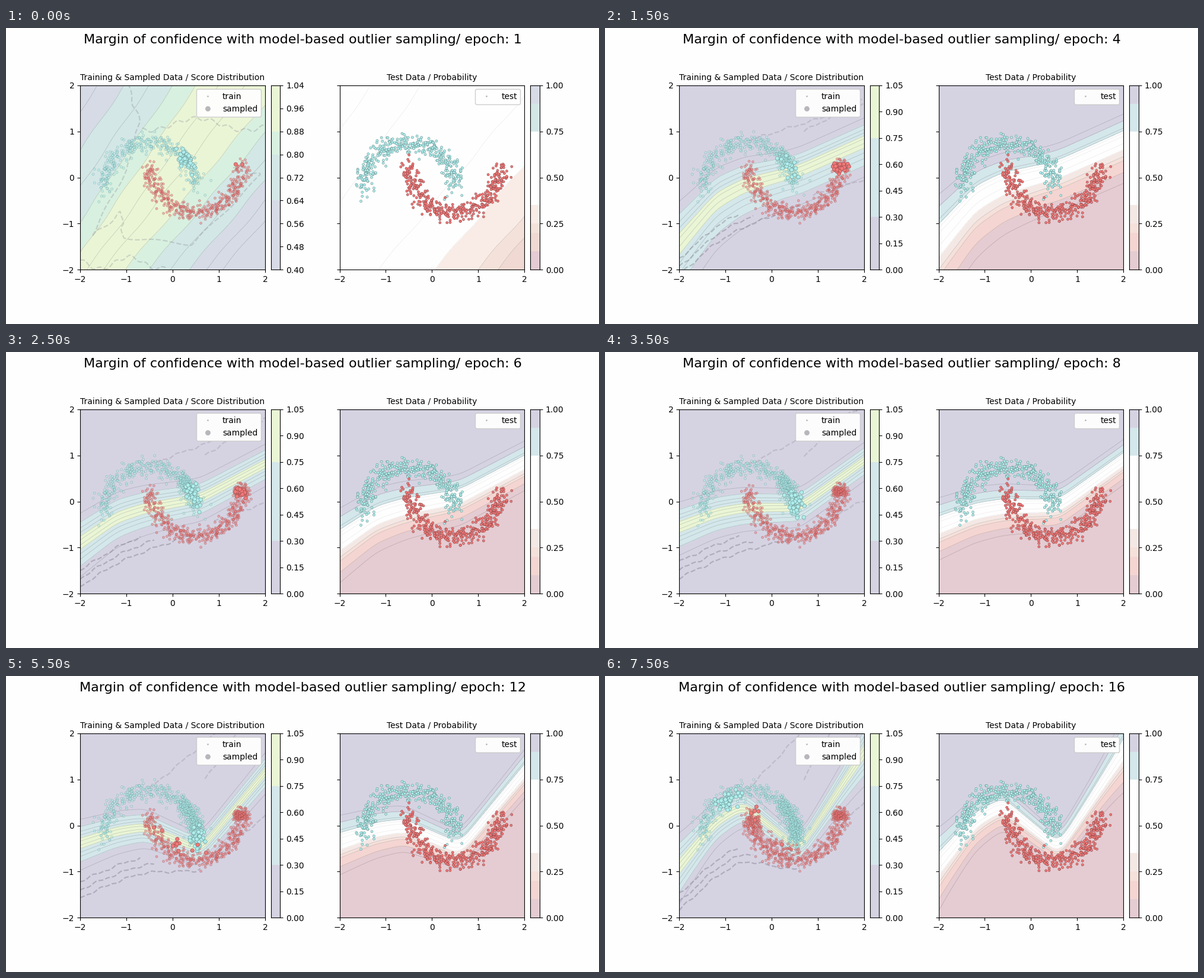
A matplotlib script that plays this animation: 1000 by 500 pixels, repeating every 8000 ms.

```python
import numpy as np
import matplotlib.pyplot as plt
from matplotlib.animation import FuncAnimation
from matplotlib.colors import to_rgb
from matplotlib.lines import Line2D

plt.rcParams["font.family"] = "DejaVu Sans"
W, H = 1000, 500
EPOCHS, BATCH = 16, 50
PAPER, TEAL, RED = "#fefefe", "#aeeeec", "#f07878"
PURPLE, BLUE, LIME = "#d5d3e2", "#d4e7ea", "#eaf5d6"
MIST, SKY, GREEN = "#d7dbe6", "#d3e7e6", "#d8f0e0"
PINKS = ["#e4ccd2"] * 2 + ["#f4d5d2", "#f6e0da", "#f4e8e5"]
PEACHES = ["#e5cbd3"] * 2 + ["#f0d9d2", "#f4e2da", "#f9ebe5"]

axis = np.linspace(-2, 2, 200)
GX, GY = np.meshgrid(axis, axis)


def bell(t, peak, width):
    return np.exp(-((t - peak) / width) ** 2)


def moon(cls, angle, radius):
    x, y = radius * np.cos(angle), radius * np.sin(angle)
    return (x - .5, y - .25) if cls == 0 else (x + .5, .25 - y)


def join(groups):
    """Merge (class, x, y) groups into coordinates and colours."""
    cols = [(TEAL, RED)[cls] for cls, x, _ in groups for _ in x]
    return (np.concatenate([g[1] for g in groups]),
            np.concatenate([g[2] for g in groups]), cols)


def make_moons(n, seed):
    rng = np.random.default_rng(seed)
    groups = []
    for cls in (0, 1):
        x, y = moon(cls, np.linspace(0, np.pi, n), 1)
        groups.append((cls, x + rng.normal(0, .1, n), y + rng.normal(0, .1, n)))
    return join(groups)


def pick(epoch):
    """A batch shared between the places where the model is unsure."""
    # class, centre and spread in degrees, radius, weight
    spots = [
        (0, 40 - 3.7 * (epoch - 1), 8, 1.03, bell(epoch, 7, 5)),
        (1, 1.2 * epoch - 3, 4, .98, 1.4 * bell(epoch, 4.3, 1.5)),
        (1, 6 * epoch + 80, 8, .9, 3 * bell(epoch, 14.5, 1.1)),
        (1, 110, 20, .79, 1.2 * bell(epoch, 14, 1.3)),
        (0, 120, 10, .9, 6 * bell(epoch, 16.5, .8))]
    total = sum(s[-1] for s in spots)
    rng = np.random.default_rng(epoch)
    groups = []
    for cls, centre, spread, radius, weight in spots:
        n = round(BATCH * weight / total)
        angle = np.radians(rng.normal(centre, spread, n))
        groups.append((cls, *moon(cls, angle, rng.normal(radius, .08, n))))
    return join(groups)


def boundary(epoch, at):
    """Smooth curve through the edges, the crest and the trough."""
    t = max(epoch - 4, 0) / 12
    lo = -.36 - .021 * (max(epoch, 4) - 11) ** 2
    crest = -.14 + .58 * t ** 4
    trough = -.2 + .38 * np.cos(np.pi * (.5 + 12 * t) / 10.5)
    hi = .8 + .8 * t ** 2
    knots = [-2, -1.2, -.6, 0, .6, 2]
    heights = [lo, lo + .74 * (crest - lo), crest, (crest + trough) / 2,
               trough, hi]
    x = np.linspace(-3, 3, 601)
    y = np.interp(x, knots, heights)
    first, last = np.diff(heights)[[0, -1]] / np.diff(knots)[[0, -1]]
    y += first * np.minimum(x + 2, 0) + last * np.maximum(x - 2, 0)
    kernel = bell(np.arange(-40, 41) / 100, 0, .18)
    return np.interp(at, x, np.convolve(y, kernel / kernel.sum(), "same"))


def untrained_logit():
    u = GY - 1.17 * GX + .03 * np.sin(5 * GY)
    upper = .225 * (u - .3 * (GX + .6))
    lower = .23 * u + .01 * u ** 3 - .06
    return lower + (upper - lower) / (1 + np.exp(-4 * u))


def trained_logit(epoch):
    e = max(epoch, 4)
    steep = np.interp(axis, [-2, .3, 2], [5 - .05 * (e - 10.5) ** 2,
                                          5.2 + .27 * (e - 4),
                                          6.5 - .055 * (e - 9) ** 2])
    d = GY - boundary(epoch, axis)
    soft = .87 - .25 * np.exp(4 - e)
    return steep * d * np.where(d < 0, soft, 1)


def logit(epoch):
    w = min((epoch - 1) / 3, 1) ** .8
    return (1 - w) * untrained_logit() + w * trained_logit(epoch)


def dash_paths(epoch):
    """Density lines: winding at first, then following the boundary."""
    if epoch == 1:
        x = np.linspace(-2, 2, 120)
        yield x[:56], -1.85 + .13 * np.sin(5 * x[:56]) + .04 * np.sin(19 * x[:56]), .2
        yield x[40:], 1.15 + .13 * np.sin(3 * x[40:]) + .04 * np.sin(17 * x[40:]), .2
        px = [-.97, -.72, -.97, -1.78, -1.1, -1.08, .44, 1.9, 1.3]
        py = [2, 1.2, .2, -1.3, -.75, -1.3, -1.45, .05, .2]
        s = np.linspace(0, len(px) - 1, 160)
        i = range(len(px))
        yield (np.interp(s, i, px) + .03 * np.sin(9 * s),
               np.interp(s, i, py) + .03 * np.cos(8 * s), .2)
        return

    def wave(x, k):
        return .02 * np.sin(11 * x + k + epoch) + .012 * np.sin(23 * x + 2 * k)

    for k, (drop, end) in enumerate([(.85, .6), (.68, -.4), (.5, -.7)]):
        x = np.linspace(-2, end, 80)
        yield x, .55 * boundary(epoch, x) + .25 * x - drop + wave(x, k), .3
    slope = np.diff(boundary(epoch, [1, 2]))[0]
    for k, (start, base) in enumerate([(-.5, .8), (.7, 1)]):
        x = np.linspace(start, 2, 80)
        yield x, base + (.7 + .5 * k) * slope * (x - start) + wave(x, k), .18
    x = np.linspace(.9, 2, 40)
    yield x, .7 * boundary(epoch, x) - .6 + wave(x, 5), .18


def shade(color, f):
    return tuple(f * c for c in to_rgb(color))


def place(x, width):
    return fig.add_axes([x / W, 1 - (TOP + SIDE) / H, width / W, SIDE / H])


def bands(ax, field, levels, colors):
    fill = ax.contourf(GX, GY, field, levels, colors=colors, zorder=0)
    edges = [shade(c, .93 if c == PAPER else .82) for c in colors[1:]]
    lines = ax.contour(GX, GY, field, levels[1:-1], colors=edges,
                       linewidths=.5, linestyles="solid", zorder=.5)
    return [fill, lines]


def color_bar(ax, levels, colors, ticks):
    ax.cla()
    for lo, hi, c in zip(levels, levels[1:], colors):
        ax.axhspan(lo, hi, color=c, lw=0)
    ax.set(xlim=(0, 1), ylim=(levels[0], levels[-1]), xticks=[])
    ax.yaxis.tick_right()
    ax.set_yticks(ticks, [f"{t:.2f}" for t in ticks])


def dots(ax, data, size, alpha, z):
    x, y, cols = data
    return ax.scatter(x, y, s=size, c=cols, alpha=alpha, linewidths=.4,
                      edgecolors=[shade(c, .6) for c in cols], zorder=z)


def key_mark(size, label):
    return Line2D([], [], ls="", marker="o", ms=size, mew=0,
                  color="#b9b6bb", label=label)


PROB = [0, .05, .1, .2, .25, .35, .45, .62, .7, .75, .8, .9, .95, 1]
PROB_COLORS = PINKS + [PAPER] * 4 + [BLUE] * 2 + [PURPLE] * 2
PROB_FIRST = PEACHES + [PAPER] * 4 + [SKY] * 2 + [MIST] * 2
SCORE = np.arange(8) * .15
SCORE_COLORS = [PURPLE] * 2 + [BLUE] * 3 + [LIME] * 2
SCORE_START = .4 + np.arange(9) * .08
SCORE_FIRST = [MIST] * 3 + [SKY] * 2 + [GREEN] + [LIME] * 2

fig = plt.figure(figsize=(W / 100, H / 100), dpi=100, facecolor=PAPER)
heading = fig.suptitle("", fontsize=16)
SIDE, TOP, BAR = 311.9, 96.55, 15.6
left, left_bar = place(125, SIDE), place(446.9, BAR)
right, right_bar = place(562.5, SIDE), place(884.4, BAR)

for ax, title in ((left, "Training & Sampled Data / Score Distribution"),
                  (right, "Test Data / Probability")):
    ax.set(xlim=(-2, 2), ylim=(-2, 2), xticks=range(-2, 3),
           yticks=range(-2, 3), facecolor=PAPER)
    ax.set_title(title, fontsize=10)
right.tick_params(labelleft=False)
left.legend(handles=[key_mark(2, "train"), key_mark(6.4, "sampled")],
            loc="upper right", framealpha=.95)
right.legend(handles=[key_mark(2, "test")], loc="upper right", framealpha=.95)

dots(left, make_moons(400, 3), 8.5, .5, 2)
dots(right, make_moons(400, 8), 8.5, 1, 2)
batches = [pick(e) for e in range(1, EPOCHS + 1)]
drawn = []


def update(i):
    epoch = i + 1
    while drawn:
        drawn.pop().remove()
    heading.set_text("Margin of confidence with model-based outlier "
                     f"sampling/ epoch: {epoch}")

    levels, colors, prob_colors = SCORE, SCORE_COLORS, PROB_COLORS
    if epoch == 1:
        levels, colors, prob_colors = SCORE_START, SCORE_FIRST, PROB_FIRST
    prob = 1 / (1 + np.exp(-logit(epoch)))
    score = np.maximum(1 - np.abs(2 * prob - 1), levels[0] + 1e-4)
    drawn.extend(bands(left, score, levels, colors))
    drawn.extend(bands(right, prob, PROB, prob_colors))
    color_bar(left_bar, levels, colors, levels)
    color_bar(right_bar, PROB, prob_colors, [0, .25, .5, .75, 1])

    for x, y, alpha in dash_paths(epoch):
        drawn.extend(left.plot(x, y, "--", color="#5c5266", lw=1.6,
                               alpha=alpha, zorder=1))
    for batch in batches[:i]:
        drawn.append(dots(left, batch, 8.5, .5, 2.1))
    drawn.append(dots(left, batches[i], 21, 1, 2.2))
    return drawn


anim = FuncAnimation(fig, update, frames=EPOCHS, interval=500, repeat=True)
plt.show()
```
